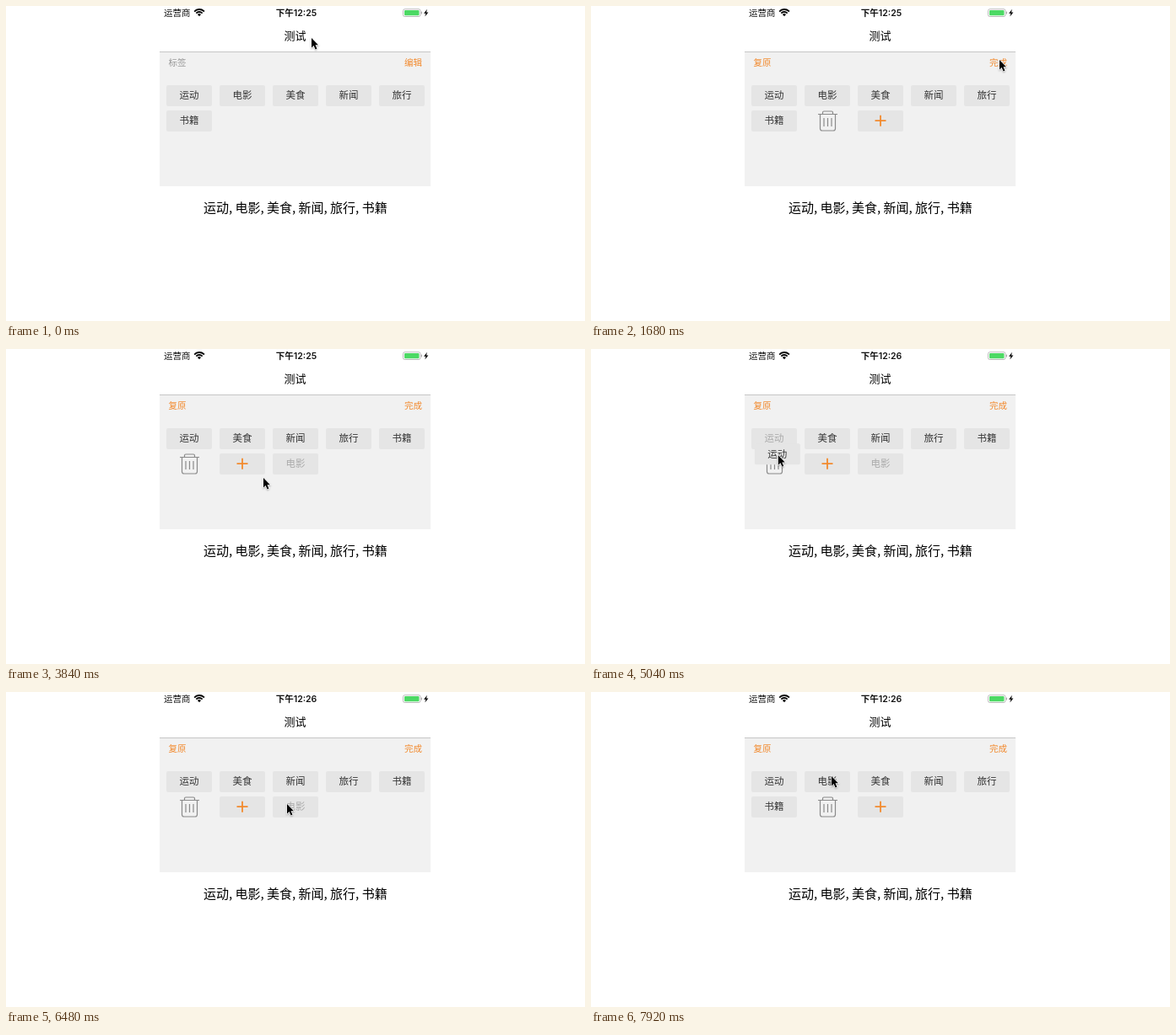
Recreate the animation shown at these times as an HTML page with a canvas. Size 686 by 374 pixels, loop 8000 ms.

```html
<!DOCTYPE html>
<html lang="zh-CN">
<head>
<meta charset="utf-8">
<style>
html, body { margin: 0; width: 100%; height: 100%; overflow: hidden; background: #fff; }
canvas { display: block; }
</style>
</head>
<body>
<canvas id="stage" width="686" height="374"></canvas>
<script>
const g = document.getElementById('stage').getContext('2d');
const LOOP = 8000, STEP = 80;
const ORANGE = '#f28a2e', GRAY = '#8a8a8a';
const CJK = '"Noto Sans CJK SC", "Noto Sans CJK", sans-serif';

const TAGS = ['运动', '电影', '美食', '新闻', '旅行', '书籍'];
const FULL = [...TAGS, 'trash', 'add'];
const CUT = [...FULL.filter(n => n !== '电影'), '电影'];

// Pointer moves: start, end, x, y
const MOVES = [
  [0, 320, 484, 64], [1680, 2160, 284, 105],
  [2880, 3360, 282, 135], [3440, 3840, 305, 153],
  [3920, 4320, 218, 108], [4720, 5120, 222, 127], [5200, 5360, 258, 129],
  [5520, 5760, 308, 153], [5760, 5920, 333, 133], [7040, 7760, 285, 100]
];

// Drags: tag, press, release
const DRAGS = [['电影', 2880, 3520], ['运动', 4720, 5120], ['电影', 7040, 7680]];

const lerp = (a, b, k) => a + (b - a) * k;
const ramp = (t, a, b) => Math.max(0, Math.min(1, (t - a) / (b - a)));
const smooth = k => k * k * (3 - 2 * k);
const easeOut = k => 1 - (1 - k) ** 2;

function pointer(t) {
  let x = 362, y = 38;
  for (const [start, end, toX, toY] of MOVES) {
    const k = easeOut(ramp(t, start, end));
    x = lerp(x, toX, k);
    y = lerp(y, toY, k);
  }
  return [x, y];
}

const slot = i => [190 + 63 * (i % 5), 94 + 30 * Math.floor(i / 5)];

function place(name, t) {
  const k = smooth(ramp(t, 3440, 3760)) - smooth(ramp(t, 7280, 7600));
  const a = slot(FULL.indexOf(name)), b = slot(CUT.indexOf(name));
  return [lerp(a[0], b[0], k), lerp(a[1], b[1], k)];
}

// y is the middle of the line
function text(s, x, y, size, color, align = 'center', font = CJK, weight = 400) {
  g.font = `${weight} ${size}px ${font}`;
  g.fillStyle = color;
  g.textAlign = align;
  g.fillText(s, x, y + size * 0.33);
}

function box(x, y, w, h, r, color) {
  g.fillStyle = color;
  g.beginPath();
  g.roundRect(x, y, w, h, r);
  g.fill();
}

function stroke(d, color, width) {
  g.strokeStyle = color;
  g.lineWidth = width;
  g.stroke(new Path2D(d));
}

function fill(d, color) {
  g.fillStyle = color;
  g.fill(new Path2D(d));
}

function tag(name, x, y, color) {
  box(x, y, 54, 25, 2, '#e5e5e5');
  text(name, x + 27, y + 12.5, 11.5, color);
}

function trash(x, y) {
  g.save();
  g.translate(x + 27.5, y);
  stroke('M-11.5 4.5H11.5M-6 4.5V2.5Q-6 1-4.5 1H4.5Q6 1 6 2.5V4.5M-9 4.5V21.5Q-9 24-6.5 24H6.5Q9 24 9 21.5V4.5', GRAY, 1.2);
  stroke('M-4.5 9V19M0 9V19M4.5 9V19', GRAY, 1.2);
  g.restore();
}

function add(x, y) {
  box(x, y, 54, 25, 2, '#e5e5e5');
  g.save();
  g.translate(x + 27, y + 12.2);
  stroke('M-6.5 0H6.5M0-6.5V6.5', ORANGE, 1.8);
  g.restore();
}

function statusBar(t) {
  text('运营商', 187, 8.5, 10.5, '#111', 'left');
  text(t < 4160 ? '下午12:25' : '下午12:26', 344, 8.5, 10.5, '#111', 'center', 'Inter, ' + CJK, 600);

  // Wi-Fi: two arcs and a wedge
  const [from, to] = [-Math.PI * 0.76, -Math.PI * 0.24];
  g.strokeStyle = g.fillStyle = '#000';
  g.lineWidth = 1.8;
  for (const r of [8, 5]) {
    g.beginPath();
    g.arc(229, 12, r, from, to);
    g.stroke();
  }
  g.beginPath();
  g.moveTo(229, 12.2);
  g.arc(229, 12, 2.8, from, to);
  g.fill();

  g.strokeStyle = '#aaa';
  g.lineWidth = 0.8;
  g.beginPath();
  g.roundRect(470.5, 3.7, 20.5, 8.8, 2);
  g.stroke();
  box(472, 5, 17.5, 6.2, 1, '#4cd964');
  box(491.8, 6.6, 1.2, 3, 0.6, '#aaa');
  fill('M499 3.8L495 8.8H497.4L496.4 12.5L500.4 7.4H498Z', '#000');
}

function drawPointer(x, y) {
  const d = 'M0 0V13L3 10.2L5.2 15.3L7.3 14.4L5.1 9.5H9Z';
  g.save();
  g.translate(x, y);
  g.scale(0.88, 0.88);
  g.shadowColor = 'rgba(0,0,0,.3)';
  g.shadowBlur = 2;
  g.shadowOffsetY = 1;
  stroke(d, '#fff', 1.4);
  g.shadowColor = 'transparent';
  fill(d, '#000');
  g.restore();
}

function draw(t) {
  const editing = t >= 1360;
  const drag = DRAGS.find(([, press, release]) => t > press + STEP && t < release);
  const [px, py] = pointer(t);

  box(0, 0, 686, 374, 0, '#fff');
  statusBar(t);
  text('测试', 342.5, 36, 13, '#000');
  box(182, 54, 321, 160, 0, '#f1f1f1');
  box(182, 54, 321, 1, 0, '#c6c6c6');

  text(editing ? '复原' : '标签', 192.5, 68, 10.5, editing ? ORANGE : '#999', 'left');
  text(editing ? '完成' : '编辑', 493, 68, 10.5, ORANGE, 'right');

  for (const name of FULL) {
    const [x, y] = place(name, t);
    if (TAGS.includes(name)) {
      const faded = drag && drag[0] === name || name === '电影' && t > 2960 && t < 7680;
      tag(name, x, y, faded ? '#aaa' : '#333');
    } else {
      g.globalAlpha = ramp(t, 1280, 1600);
      (name === 'add' ? add : trash)(x, y);
      g.globalAlpha = 1;
    }
  }

  if (drag) {
    const [name, press] = drag, [x, y] = place(name, press), [gx, gy] = pointer(press);
    tag(name, x + px - gx, y + py - gy, '#333');
  }

  text(TAGS.join(', '), 342.8, 240, 15, '#000');
  drawPointer(px, py);
}

function tick() {
  const t = performance.now() % LOOP;
  draw(Math.floor(t / STEP) * STEP);
  requestAnimationFrame(tick);
}
tick();
</script>
</body>
</html>
```
